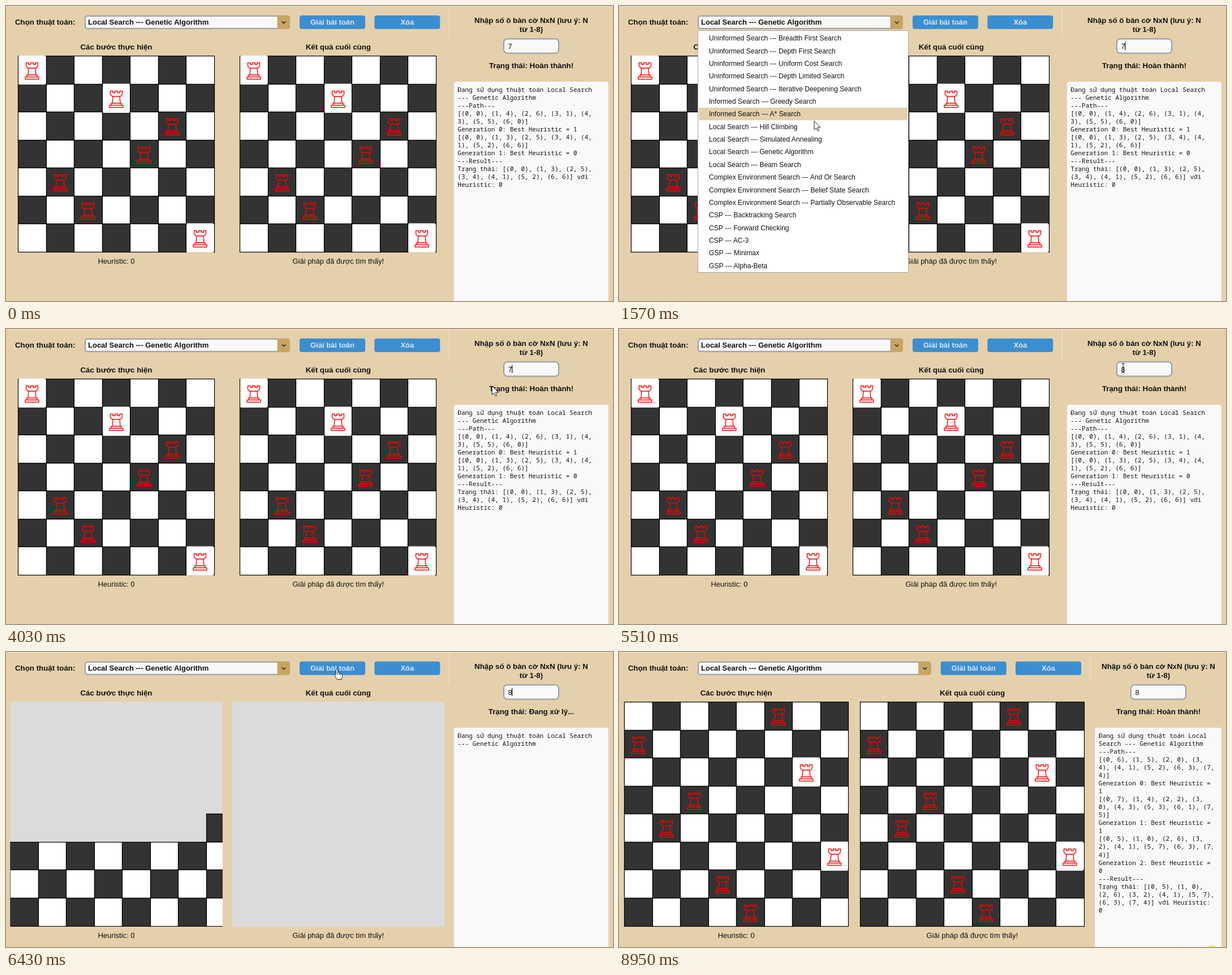
An HTML page for the animation above (9.01 s loop, 1073x522 px).

```html
<!DOCTYPE html>
<html lang="vi">
<head>
<meta charset="utf-8">
<title>Bàn cờ quân xe</title>
<style>
html, body { margin: 0; width: 100%; height: 100%; overflow: hidden; background: #e5d0ac; }
svg { display: block; width: 1073px; height: 522px; }
text { font-family: "Liberation Sans", Arial, sans-serif; font-size: 13px; fill: #111; }
.b { font-weight: bold; font-size: 13.3px; }
.pick { font-weight: bold; }
.c { text-anchor: middle; }
.btn { font-weight: bold; fill: #dce4ee; }
.item { font-size: 12.1px; }
.log { font-family: "Noto Sans Mono", "DejaVu Sans Mono", monospace; font-size: 11px; }
</style>
</head>
<body>
<svg viewBox="0 0 1073 522">
  <defs>
    <g id="rook" fill="none" stroke="#f00" stroke-width="1.4" stroke-linejoin="round">
      <path d="M-10.5-14h4.5v3h3.5v-3h5v3h3.500v-3h4.500v6l-3.500 3.500h-14l-3.500-3.500z"/>
      <path d="M-6-4.500L-7 7.500M6-4.500L7 7.500M-9 7.500h18v3.500h-18zM-12 11h24v4h-24z"/>
    </g>
    <path id="arrow" d="M0 0v15.500l3.600-3.300 2.600 5.600 2.300-1-2.500-5.600h5z" fill="#fff" stroke="#222"/>
    <g id="hand" stroke="#222">
      <path d="M-1.500 9V1.500q1.500-3.400 3 0V6q2.400-1 3 1t2.500 1 2.500 2v3.500l-1.500 5h-7.500l-5-7q0-3 3-1z" fill="#fff"/>
      <path d="M1.500 6v4M4.500 7v3.500M7 8v3"/>
    </g>
    <path id="beam" d="M-3-8h6M0-8v16M-3 8h6" stroke="#222"/>
  </defs>
  <g id="scene"></g>
  <use id="mouse"/>
</svg>
<script>
const LOOP = 9010, CELL = 49.55, TOP = 88.2, ROW = 22.35;
const CLICK = 6220, CLEAR = 6360, FILL = 6430, WIDE = 6640, SOLVED = 6700, DONE = 7720;
const ENTER = 130, LEAVE = 8620, OPEN = 1290, CLOSE = 3130;
const scene = document.getElementById('scene');
const mouse = document.getElementById('mouse');

// One digit per row: the rook's column.
const OLD = ['0461350', '0354126'];
const NEW = ['65041234', '74203315', '50621734'];

const GROUPS = {
  'Uninformed Search': 'Breadth First Search,Depth First Search,Uniform Cost Search,Depth Limited Search,Iterative Deepening Search',
  'Informed Search': 'Greedy Search,A* Search',
  'Local Search': 'Hill Climbing,Simulated Annealing,Genetic Algorithm,Beam Search',
  'Complex Environment Search': 'And Or Search,Belief State Search,Partially Observable Search',
  'CSP': 'Backtracking Search,Forward Checking,AC-3',
  'GSP': 'Minimax,Alpha-Beta'
};
const MENU = Object.entries(GROUPS).flatMap(([g, list]) => list.split(',').map(s => g + ' --- ' + s));
const PICK = 'Local Search --- Genetic Algorithm';

// Pointer moves: begin, end, and the place reached.
const MOVES = [
  [130, 500, 893, 73], [600, 890, 400, 28], [OPEN, 1850, 324, 271],
  [2180, 2250, 320, 272], [2510, 2650, 307, 258], [3540, 3890, 712, 38],
  [3890, 4030, 859, 101], [4030, 4310, 892, 69], [5510, 6200, 585, 30], [7990, LEAVE, 1036, 522]
];

const clamp = v => Math.max(0, Math.min(1, v));
const ease = k => 1 - (1 - clamp(k)) ** 1.84;
const text = (x, y, s, cls = '') => `<text x="${x}" y="${y}" class="${cls}">${s}</text>`;
const rect = (x, y, w, h, fill, more = '') =>
  `<rect x="${x}" y="${y}" width="${w}" height="${h}" fill="${fill}" ${more}/>`;
const inside = (p, x, y, w, h) => p.x >= x && p.x <= x + w && p.y >= y && p.y <= y + h;

function pointer(t) {
  const p = { x: 985, y: 515 };
  for (const [a, b, x, y] of MOVES) {
    const k = ease((t - a) / (b - a));
    p.x += (x - p.x) * k;
    p.y += (y - p.y) * k;
  }
  return p;
}

// The caret restarts its blink at each click or key press.
function caretOn(t) {
  const start = [4920, 4100, 470].find(s => t >= s);
  return start !== undefined && (t - start) % 1100 < 550;
}

function wrap(line, width) {
  const out = [''];
  for (const word of line.split(' ')) {
    const i = out.length - 1, next = out[i] ? out[i] + ' ' + word : word;
    if (next.length > width) out.push(word);
    else out[i] = next;
  }
  return out;
}

function report(gens, width) {
  const lines = ['Đang sử dụng thuật toán ' + PICK];
  const cells = g => '[' + [...g].map((c, r) => `(${r}, ${c})`).join(', ') + ']';
  const last = gens.length - 1;
  if (last >= 0) {
    lines.push('---Path---');
    gens.forEach((g, i) => lines.push(cells(g), `Generation ${i}: Best Heuristic = ${i < last ? 1 : 0}`));
    lines.push('---Result---', `Trạng thái: ${cells(gens[last])} với Heuristic: 0`);
  }
  return lines.flatMap(s => wrap(s, width));
}

function board(x0, n, rooks = '', first = 0) {
  let s = '';
  const at = (o, i) => Math.round(o + i * CELL) + .5;
  for (let i = first; i < n * n; i++) {
    const r = Math.floor(i / n), c = i % n, x = at(x0, c), y = at(TOP, r);
    s += rect(x, y, at(x0, c + 1) - x, at(TOP, r + 1) - y, (r + c) % 2 ? '#333' : '#fff', 'stroke="#000" stroke-width="1.2"');
  }
  [...rooks].forEach((c, r) => {
    const x = at(x0, c), y = at(TOP, r);
    if ((r + +c) % 2 === 0) s += rect(x + 1, y - 1, 47, 51.5, '#fff');
    s += `<use href="#rook" x="${x + 24.5}" y="${y + 26}"/>`;
  });
  return s;
}

const clipped = (x, body) =>
  `<svg x="${x}" y="88" width="375.5" height="398" viewBox="${x} 88 375.5 398">${rect(x, 88, 376, 398, '#dbdbdb')}${body}</svg>`;

function boards(t) {
  if (t < CLEAR) return board(21, 7, OLD[1]) + board(413, 7, OLD[1]);
  if (t < WIDE) {
    const first = t < FILL ? 64 : t < FILL + 70 ? 39 : 0;
    return clipped(7.5, board(7, 8, '', first)) + clipped(399.5, board(399, 8, '', t < FILL + 140 ? 64 : 0));
  }
  const step = Math.min(2, Math.floor((t - 6830) / 270));
  return board(9, 8, t < SOLVED ? '' : NEW[Math.max(0, step)]) + board(425.5, 8, t < SOLVED + 70 ? '' : NEW[2]);
}

function button(x, label, p, live) {
  const hot = live && inside(p, x, 16.7, 116, 24);
  return rect(x, 16.7, 116, 24, hot ? '#36719f' : '#3b8ed0', 'rx="4"') + text(x + 58, 33, label, 'btn c');
}

function combo(w) {
  const end = 139 + w, a = end - 11;
  return rect(140, 17.7, w - 2, 22, '#f9f9fa', 'rx="4" stroke="#979da2" stroke-width="2"') +
    `<path d="M${end - 22.5} 16.7h18.5q4 0 4 4v16q0 4-4 4h-18.5z" fill="#c8a563"/>` +
    `<path d="M${a - 3.5} 27.5l3.5 3 3.5-3" fill="none" stroke="#222" stroke-width="1.6"/>` +
    text(145, 33, PICK, 'pick');
}

function menu(t) {
  const alpha = Math.min(clamp((t - OPEN + 20) / 200), 1 - clamp((t - CLOSE + 20) / 240));
  if (t < OPEN || alpha <= 0) return '';
  const row = Math.floor((pointer(t - 20).y - 45.8) / ROW);
  return `<g opacity="${alpha.toFixed(2)}">` +
    rect(139.5, 43.5, 372, 428, '#fff', 'stroke="#a3a3a3"') +
    (row >= 0 ? rect(141, 45.8 + row * ROW, 369, ROW, '#e5d0ac') : '') +
    MENU.map((s, i) => text(159, 61.3 + i * ROW, s, 'item')).join('') + '</g>';
}

function side(t, wide) {
  const dx = wide ? 25 : 0, mid = 928.5 + dx, left = wide ? 841.5 : 792;
  const value = t < 4920 ? '7' : t < 5050 ? '' : '8';
  const lines = report(t < CLICK ? OLD : t < SOLVED ? [] : NEW, wide ? 31 : 36);
  return text(mid, 30, 'Nhập số ô bàn cờ NxN (lưu ý: N', 'b c') + text(mid, 45.5, 'từ 1-8)', 'b c') +
    rect(880 + dx, 58.2, 97, 25.3, '#f9f9fa', 'rx="6" stroke="#979da2" stroke-width="2"') +
    text(887.5 + dx, 76, value) +
    (caretOn(t) ? rect((value ? 894 : 888) + dx, 64, 1.2, 14, '#111') : '') +
    text(mid, 110, 'Trạng thái: ' + (t >= CLICK && t < DONE ? 'Đang xử lý...' : 'Hoàn thành!'), 'b c') +
    rect(left, 134, 1065 - left, 400, '#f9f9fa', 'rx="4"') +
    lines.map((s, i) => text(left + 6.3, 151.5 + i * 14.07, s, 'log')).join('');
}

function draw(t) {
  const wide = t >= WIDE, dx = wide ? 49.7 : 0, p = pointer(t);
  const live = t >= ENTER && t < LEAVE && (t < CLICK || wide);
  const c1 = wide ? 207.2 : 195, c2 = wide ? 624.5 : 587.3, foot = t < CLEAR ? 456.2 : 506;
  const heur = t >= SOLVED && t < 7370 ? 1 : 0;
  return rect(0, 0, 1073, 522, '#e5d0ac') + rect(0, 0, 1073, 1, '#f0e5cf') +
    rect(783 + dx, 1, 1, 55, '#f0e5cf') +
    text(16, 33, 'Chọn thuật toán:', 'b') + combo(363 + dx) +
    button(519 + dx, 'Giải bài toán', p, live) + button(651.3 + dx, 'Xóa', p, live) +
    text(c1, 77, 'Các bước thực hiện', 'b c') + text(c2, 77, 'Kết quả cuối cùng', 'b c') +
    boards(t) +
    text(c1, foot, 'Heuristic: ' + heur, 'c') + text(c2, foot, 'Giải pháp đã được tìm thấy!', 'c') +
    side(t, wide) + menu(t) +
    (t >= 8950 ? '<ellipse cx="1047.5" cy="524" rx="8" ry="5" fill="#f3e96f"/>' : '');
}

function moveMouse(t) {
  const p = pointer(t), wide = t >= WIDE, dx = wide ? 49.7 : 0;
  const onButton = [519, 651.3].some(x => inside(p, x + dx, 16.7, 116, 24));
  const onText = inside(p, 879 + dx / 2, 57, 98, 28) || inside(p, 792 + dx, 134, 273 - dx, 400);
  mouse.setAttribute('href', onButton ? '#hand' : onText ? '#beam' : '#arrow');
  mouse.setAttribute('transform', `translate(${p.x.toFixed(1)} ${p.y.toFixed(1)})`);
  mouse.style.display = t >= ENTER && t < LEAVE ? '' : 'none';
}

let last = '';
function tick(now) {
  const t = now % LOOP, next = draw(t);
  if (next !== last) scene.innerHTML = last = next;
  moveMouse(t);
  requestAnimationFrame(tick);
}
tick(0);
</script>
</body>
</html>
```
